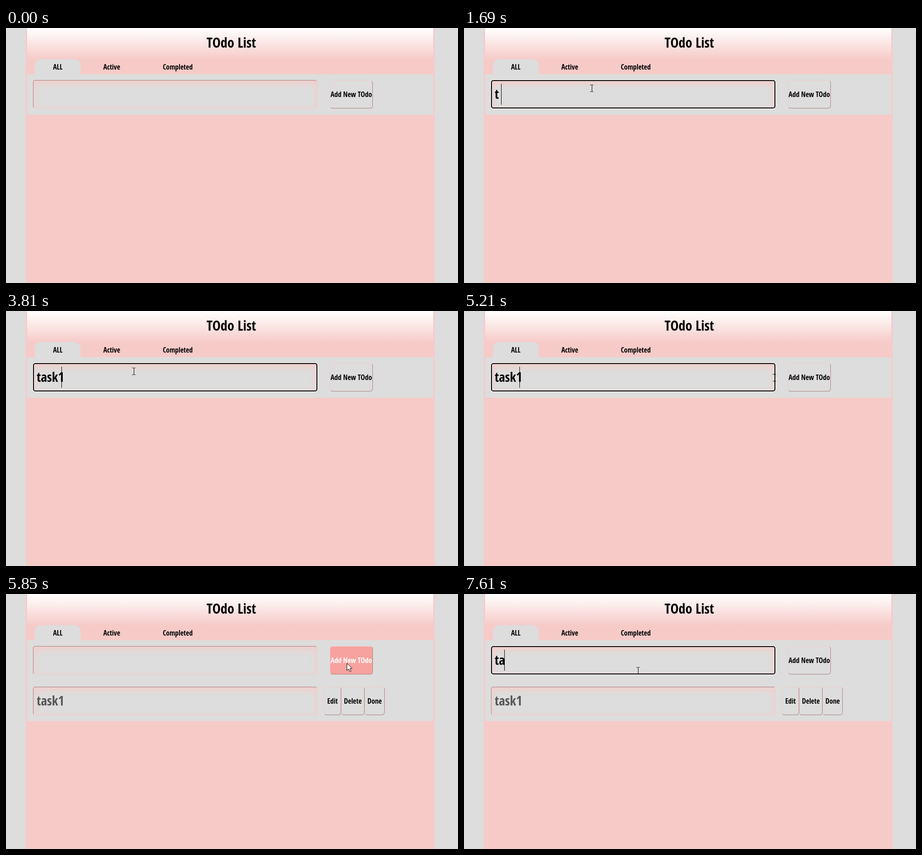
Animation, 987 px wide and 558 px high, one loop 8000 ms. Source, as an HTML page:

```html
<!DOCTYPE html>
<html lang="en">
<head>
<meta charset="utf-8">
<title>TOdo List</title>
<style>
  :root { --pink: #f6cac7; --grey: #dddddd; --dark: #a87f7d; }
  * { box-sizing: border-box; }
  html, body { margin: 0; width: 100%; height: 100%; overflow: hidden; background: var(--grey); }
  body, div, svg { position: absolute; }
  body {
    font: 500 15.5px/20px "Open Sans Condensed", "Open Sans", "Noto Sans", sans-serif;
    font-stretch: 75%; color: #000; white-space: nowrap;
  }
  #page { left: 43px; top: 0; width: 893px; height: 558px; background: var(--pink); }
  #head { left: 46px; top: 0; width: 887px; height: 70px; background: linear-gradient(#fff, var(--pink)); }
  #title { left: 46px; top: 12px; width: 892px; font-size: 30px; line-height: 40px; text-align: center; }
  .tab { top: 68px; width: 100px; height: 33px; line-height: 34px; text-align: center; border-radius: 14px 14px 0 0; }
  .tab.on { background: var(--grey); }
  #panel { left: 46px; top: 101px; width: 887px; background: var(--grey); }
  .field {
    left: 59px; top: 0; width: 621px; height: 62px; padding-left: 7px;
    font-size: 28.5px; line-height: 59px; border: 1px solid; border-radius: 5px;
    border-color: var(--dark) var(--pink) var(--pink) var(--dark);
    box-shadow: inset 0 5px 15px var(--pink);
  }
  .field.focus {
    padding-left: 6px; line-height: 57px; border: 2px solid #000;
    box-shadow: 0 0 0 1px #fff, inset 0 5px 15px var(--pink);
  }
  .btn {
    top: 0; height: 62px; line-height: 60px; text-align: center; border: 1px solid; border-radius: 6px;
    border-color: var(--pink) var(--dark) var(--dark) var(--pink);
  }
  .btn.hover { background: #f7a29e; color: #fff; }
  .btn.down { border-color: var(--dark) var(--pink) var(--pink) var(--dark); }
  #entry { left: 0; top: 114px; }
  #row { left: 0; top: 203px; }
  #caret { top: 122px; width: 1px; height: 46px; background: #000; }
  svg { left: 0; top: 0; overflow: visible; }
  [hidden] { display: none; }
</style>
</head>
<body>
<div id="page"></div>
<div id="head"></div>
<div id="title">TOdo List</div>
<div class="tab on" style="left:63px">ALL</div>
<div class="tab" style="left:181px">Active</div>
<div class="tab" style="left:325px">Completed</div>
<div id="panel"></div>
<div id="entry">
  <div id="input" class="field"></div>
  <div id="add" class="btn" style="left:707px;width:94px">Add New TOdo</div>
</div>
<div id="row" hidden>
  <div class="field" style="color:#555">task1</div>
  <div class="btn" style="left:694px;width:38px">Edit</div>
  <div class="btn" style="left:732px;width:51px">Delete</div>
  <div class="btn" style="left:783px;width:44px">Done</div>
</div>
<div id="caret"></div>
<svg id="arrow" width="13" height="20"><path d="M.5 .5V16.5L4.2 13L7 19L9.6 17.8L6.9 12H11.8Z" fill="#fff" stroke="#000"/></svg>
<svg id="beam" width="9" height="17"><path d="M-3.5 -7.5H-1L.5 -6.5L2 -7.5H3.5M.5 -6.5V6.5M-3.5 7.5H-1L.5 6.5L2 7.5H3.5" fill="none" stroke="#000"/></svg>
<script>
const LOOP = 8000;
const $ = id => document.getElementById(id);
const [panel, input, add, row, caret, arrow, beam] =
  ['panel', 'input', 'add', 'row', 'caret', 'arrow', 'beam'].map($);

// Pointer legs: start, end, positions shown, from, to
const legs = [
  [180, 620, 7, 306, 183, 279, 132],
  [4640, 4880, 4, 320, 134, 616, 145],
  [5210, 5450, 4, 678, 146, 744, 151],
  [6180, 6720, 8, 728, 152, 380, 168]
];
const keys = [1690, 1960, 2170, 3320, 3810];
const keysAgain = [7370, 7610];
const caretX = [67, 81, 88, 100, 114, 121];
const blinks = [[620, 1110], [1690, 2670], [3160, 4390], [4880, 5370], [6720, 7210], [7370, LOOP]];

const within = (t, a, b) => t >= a && t < b;

function pointer(t) {
  const leg = legs.filter(l => t >= l[0]).pop();
  if (!leg) return null;
  const [a, b, n, x0, y0, x1, y1] = leg;
  const step = Math.min(n - 1, Math.floor((t - a) / (b - a) * (n - 1) + 1e-6));
  const u = step / (n - 1), e = u * u * (3 - 2 * u);
  return { x: Math.round(x0 + (x1 - x0) * e), y: Math.round(y0 + (y1 - y0) * e) };
}

function place(el, on, p) {
  el.style.display = on ? 'block' : 'none';
  if (on) el.style.transform = `translate(${p.x}px, ${p.y}px)`;
}

function render(t) {
  const p = pointer(t);
  const inField = !!p && p.x >= 59 && p.x < 680 && p.y >= 114 && p.y < 176;
  const onAdd = !!p && p.x >= 707 && p.x < 801;
  const added = t >= 5850;
  const typed = (added ? keysAgain : keys).filter(k => t >= k).length;

  input.textContent = 'task1'.slice(0, typed);
  input.classList.toggle('focus', within(t, 620, 5700) || t >= 6720);
  add.classList.toggle('hover', onAdd);
  add.classList.toggle('down', within(t, 5700, 5850));
  row.hidden = !added;
  panel.style.height = (added ? 177 : 89) + 'px';
  caret.style.left = caretX[typed] + 'px';
  caret.hidden = !blinks.some(([a, b]) => within(t, a, b));
  place(arrow, p && !inField, p);
  place(beam, inField, p);
}

const start = performance.now();
function frame() {
  render((performance.now() - start) % LOOP);
  requestAnimationFrame(frame);
}
render(0);
requestAnimationFrame(frame);
</script>
</body>
</html>
```
